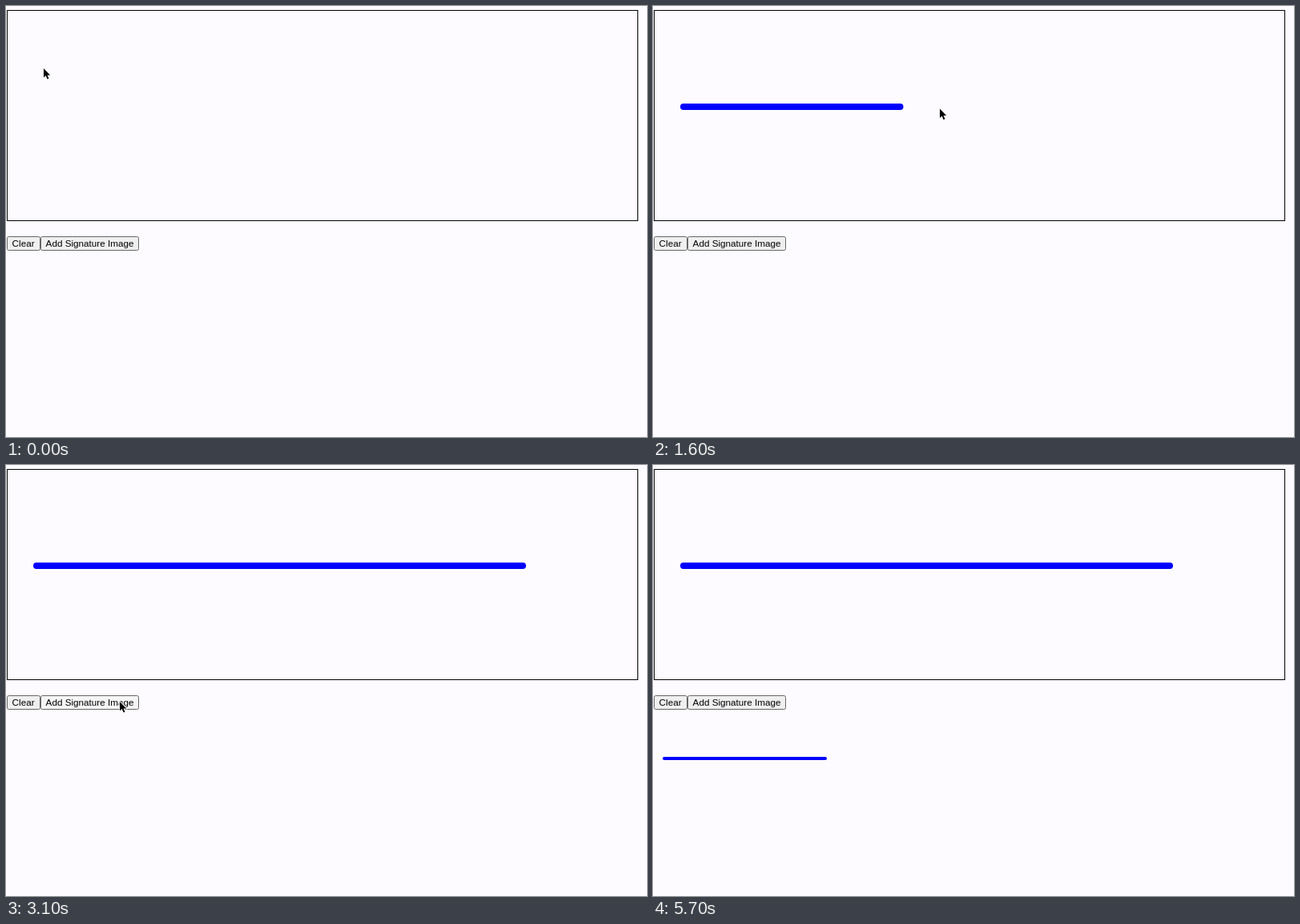
An HTML page for the animation above (5800 ms loop, 800 px wide and 539 px high).

```html
<!DOCTYPE html>
<html lang="en">
<head>
<meta charset="utf-8">
<style>
  html, body { margin: 0; width: 100%; height: 100%; overflow: hidden; background: #fdfbff; }
  svg { display: block; width: 800px; height: 539px; }
  text { font: 11.7px "Liberation Sans", Arial, sans-serif; fill: #000; }
  .button rect { fill: #efefef; stroke: #666; }
  .button.hover rect { fill: #e1e1e1; }
  .button.down rect { fill: #f5f5f5; }
  .ink { fill: none; stroke: #0000ff; stroke-linecap: round; }
</style>
</head>
<body>
<svg viewBox="0 0 800 539">
  <rect x="1.5" y="5.5" width="787" height="263" fill="none" stroke="#000"/>
  <path id="line" class="ink" stroke-width="8"/>
  <g class="button">
    <rect x="1.5" y="288.5" width="41" height="17" rx="2"/>
    <text x="7.6" y="301">Clear</text>
  </g>
  <g class="button" id="add">
    <rect x="43.5" y="288.5" width="122" height="17" rx="2"/>
    <text x="49.6" y="301">Add Signature Image</text>
  </g>
  <path id="copy" class="ink" stroke-width="4" d="M14 367H215"/>
  <path id="pointer" d="M0 0V11.5L2.7 9L4.6 13.6L6.5 12.8L4.5 8.4H8.2Z"
        stroke="#fff" stroke-width="1.6" paint-order="stroke"/>
</svg>
<script>
  const LOOP = 5800, STEP = 100;
  const ink = { left: 38, y: 126, lag: 100, begin: 300, end: 2100 };
  const home = { x: 47, y: 78 };

  // Each move starts where the last one ended; bend bows the way sideways.
  const moves = [
    { from: 200, to: 800, x: 77, y: 131, bendX: -21, bendY: 41 },
    { from: 800, to: 2100, x: 645, y: 126, power: 1.45 },
    { from: 2100, to: 2300, x: 637, y: 104 },
    { from: 2300, to: 2500, x: 222, y: 325 },
    { from: 2500, to: 2800, x: 142, y: 296, bendX: -10, bendY: 7 },
    { from: 3700, to: 4000, x: 178, y: 340 }
  ];

  const get = id => document.getElementById(id);
  const show = (el, on) => el.style.visibility = on ? "visible" : "hidden";

  function pointerAt(t) {
    let { x, y } = home;
    for (const m of moves) {
      const p = Math.min(1, Math.max(0, (t - m.from) / (m.to - m.from)));
      const eased = p ** (m.power || 1), bow = Math.sin(Math.PI * p);
      x += (m.x - x) * eased + (m.bendX || 0) * bow;
      y += (m.y - y) * eased + (m.bendY || 0) * bow;
      if (p < 1) break;
    }
    return { x, y };
  }

  function draw(now) {
    const t = Math.floor(now % LOOP / STEP) * STEP;
    const { x, y } = pointerAt(t);
    get("pointer").setAttribute("transform", `translate(${x} ${y})`);
    show(get("pointer"), t < 4000);

    // The ink trails the pointer a little
    const right = Math.max(home.x, pointerAt(Math.min(t - ink.lag, ink.end)).x);
    get("line").setAttribute("d", `M${ink.left} ${ink.y}H${right}`);
    show(get("line"), t >= ink.begin);
    show(get("copy"), t >= 3200);

    const add = get("add").classList;
    add.toggle("hover", t >= 2700 && t < 3800);
    add.toggle("down", t === 3100);
    requestAnimationFrame(draw);
  }
  draw(0);
</script>
</body>
</html>
```
